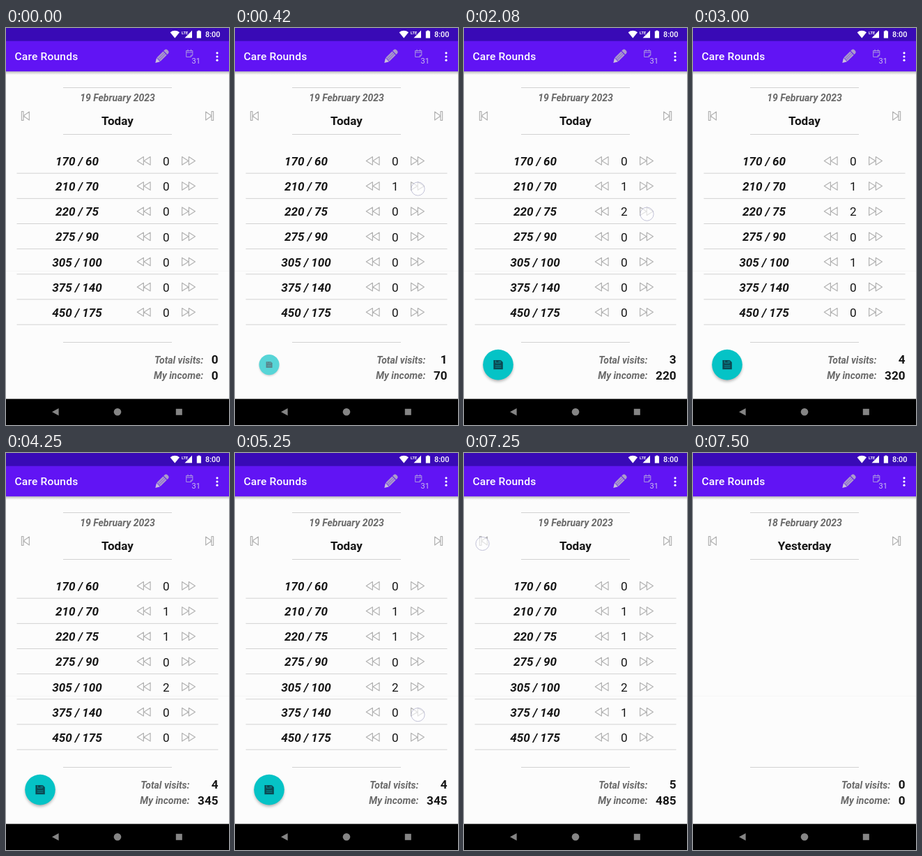
Recreate the animation shown at these times as an HTML page. Size 320 by 569 pixels, loop 8000 ms.

```html
<!DOCTYPE html>
<html lang="en">
<head>
<meta charset="utf-8">
<title>Care Rounds</title>
<style>
  html, body { margin: 0; width: 100%; height: 100%; overflow: hidden; background: #fcfcfc; }
  svg { display: block; width: 100%; height: 100%; }
  text { font-family: Roboto, sans-serif; font-size: 17.1px; fill: #161616; }
  .mid { text-anchor: middle; }
  .end { text-anchor: end; }
  .bold { font-weight: 700; }
  .italic { font-weight: 700; font-style: italic; }
  .note { font-size: 14px; fill: #6a6a6a; }
  .icon { fill: none; stroke: #b3b3b3; stroke-width: 1.2; stroke-linejoin: round; }
  .line { fill: none; stroke: #d2d2d2; }
</style>
</head>
<body>
<svg viewBox="0 0 320 569">
  <defs>
    <linearGradient id="fade" x2="0" y2="1">
      <stop stop-color="#000" stop-opacity=".26"/>
      <stop offset="1" stop-color="#000" stop-opacity="0"/>
    </linearGradient>
    <filter id="blur" x="-30%" y="-30%" width="160%" height="160%"><feGaussianBlur stdDeviation="2.2"/></filter>
    <path id="next" d="M.6-5.8 9.8 0 .6 5.8ZM10.3-5.8 19.4 0 10.3 5.8Z"/>
    <path id="skip" d="M.6-6 9 0 .6 6ZM9-6.4H11.6V6.4H9Z"/>
  </defs>
  <rect width="320" height="569" fill="#fcfcfc"/>
  <path d="M0 348.5H320" stroke="#f6f6f6"/>
  <rect y="62" width="320" height="5" fill="url(#fade)"/>
  <rect y="18" width="320" height="44.2" fill="#6114f4"/>
  <rect width="320" height="18.7" fill="#390ab6"/>

  <!-- status bar -->
  <g fill="#fff">
    <path d="M242.3 14.4 235.6 6.2A10.6 10.6 0 0 1 249 6.2Z"/>
    <path d="M256.5 14.2 267 3.6V14.2Z"/>
    <path d="M273.8 4.6H275.5V3.4H278.3V4.6H280V14.6H273.8Z"/>
    <text x="252" y="8.6" style="font-size:5.6px;font-weight:700;fill:#fff;stroke:#390ab6;stroke-width:1px;paint-order:stroke">LTE</text>
    <text x="286" y="13.4" style="font-size:10.9px;font-weight:500;fill:#fff">8:00</text>
  </g>

  <!-- app bar -->
  <text x="12.5" y="46.4" style="font-size:15.56px;font-weight:500;letter-spacing:.0125em;fill:#fff">Care Rounds</text>
  <g transform="translate(223.5 40.7) rotate(-45)" fill="#ab9bcb">
    <path d="M-13 0-7-3.6V3.6Z" fill="#c9bfda"/>
    <path d="M-6.4-3.7H6.5V3.7H-6.4Z"/>
    <path d="M7.5-3.7H9Q12.4-3.7 12.4 0T9 3.7H7.5Z"/>
    <path d="M-6.4-1.2H6.5M-6.4 1.2H6.5" stroke="#7440dc" stroke-width=".7"/>
  </g>
  <g fill="none" stroke="#a994e0">
    <path d="M258.7 32.5H267.8V39L265.2 41.5H258.7ZM258.7 35H267.8M261 30.7V33.6M265.5 30.7V33.6M267.8 39H265.2V41.5"/>
  </g>
  <text x="266.6" y="50.6" style="font-size:11px;fill:#cabdec">31</text>
  <g fill="#fff">
    <circle cx="303" cy="35.8" r="1.6"/><circle cx="303" cy="41" r="1.6"/><circle cx="303" cy="46.2" r="1.6"/>
  </g>

  <!-- day header -->
  <path class="line" d="M82 85.5H238M82 152.5H238M82 450.5H238"/>
  <text id="date" class="mid italic note" x="160" y="105.3"></text>
  <text id="day" class="mid bold" x="160" y="139.4"></text>
  <use href="#skip" class="icon" transform="translate(34 126) scale(-1 1)"/>
  <use href="#skip" class="icon" transform="translate(286 126)"/>

  <g id="rows"></g>

  <!-- totals -->
  <text id="visitsLabel" class="end italic note" y="480.6">Total visits:</text>
  <text id="incomeLabel" class="end italic note" y="503.4">My income:</text>
  <text id="visits" class="end bold" x="304.5" y="481.2"></text>
  <text id="income" class="end bold" x="304.5" y="504"></text>

  <g id="save">
    <circle cy="2.8" r="21" opacity=".32" filter="url(#blur)"/>
    <circle r="21.8" fill="#05c3c6"/>
    <path d="M-6.6-6.6H3.8L6.8-3.6V6.6H-6.6Z" fill="#0b4852"/>
    <path d="M-3.6-6V-2.4H3.2V-6M1.3-5.4V-3.4M-4.2 1.2H4.4M-4.2 3.6H4.4" fill="none" stroke="#07979d" stroke-width=".9"/>
  </g>

  <!-- navigation bar -->
  <rect y="531.6" width="320" height="38" fill="#000"/>
  <g fill="#858585">
    <path d="M66 550.3 75.6 545V555.6Z"/>
    <circle cx="160" cy="550.3" r="5.3"/>
    <rect x="243.8" y="545.8" width="9" height="9"/>
  </g>
  <circle id="touch" r="9.6" fill="#fff" fill-opacity=".62" stroke="#c3c3d8"/>
</svg>
<script>
const $ = id => document.getElementById(id);
const rates = [[170, 60], [210, 70], [220, 75], [275, 90], [305, 100], [375, 140], [450, 175]];
const TICK = 1000 / 12, LOOP = 8000;

// row, change, and the ticks when the finger lands, the count changes and the finger lifts
const taps = [
  [1, 1, 3, 4, 6], [2, 1, 19, 21, 22], [2, 1, 23, 25, 26], [4, 1, 33, 35, 36],
  [4, 1, 38, 40, 41], [2, -1, 48, 50, 51], [5, 1, 62, 64, 66]
];
// x, y, landing tick, lifting tick
const touches = taps.map(([row, change, down, , up]) =>
  [change > 0 ? 262.5 : 195, 230.5 + (row - 1) * 36.15 - (change < 0 ? 7 : 0), down, up]);
touches.push([53, 484.5, 74, 76], [26.5, 130, 87, 90]);

$('rows').innerHTML = rates.map(([price, share], i) => `
  <g transform="translate(0 ${191 + i * 36.15})">
    <text class="mid italic" x="102" y="6">${price} / ${share}</text>
    <use href="#next" class="icon" transform="translate(207.7 -.6) scale(-1 1)"/>
    <text class="mid count" x="229.7" y="6.1"></text>
    <use href="#next" class="icon" transform="translate(252 -.6)"/>
    <path class="line" d="M15.5 17.2H304.5"/>
  </g>`).join('');
const counts = document.querySelectorAll('.count');

const ramp = (t, from, to) => Math.min(1, Math.max(0, (t - from) / (to - from)));

function draw(ms) {
  const tick = Math.floor(ms / TICK + 0.05);
  const past = tick >= 89;
  const tally = rates.map(() => 0);
  if (!past) for (const [row, change, , at] of taps) if (tick >= at) tally[row] += change;

  counts.forEach((el, i) => el.textContent = tally[i]);
  $('rows').style.display = past ? 'none' : '';
  $('date').textContent = `${past ? 18 : 19} February 2023`;
  $('day').textContent = past ? 'Yesterday' : 'Today';

  const income = tally.reduce((sum, n, i) => sum + n * rates[i][1], 0);
  $('visits').textContent = tally.reduce((a, b) => a + b);
  $('income').textContent = income;
  const labelEnd = 293 - 9.84 * String(income).length;
  $('visitsLabel').setAttribute('x', labelEnd);
  $('incomeLabel').setAttribute('x', labelEnd);

  const size = ramp(tick, 3, 6) * (1 - ramp(tick, 74, 77));
  $('save').setAttribute('transform', `translate(49 482.6) scale(${size})`);
  $('save').setAttribute('opacity', size);

  const touch = touches.find(([, , down, up]) => tick >= down && tick < up);
  $('touch').style.display = touch ? '' : 'none';
  if (touch) $('touch').setAttribute('transform', `translate(${touch[0]} ${touch[1]})`);
}

const start = performance.now();
function loop() {
  draw((performance.now() - start) % LOOP);
  requestAnimationFrame(loop);
}
loop();
</script>
</body>
</html>
```
